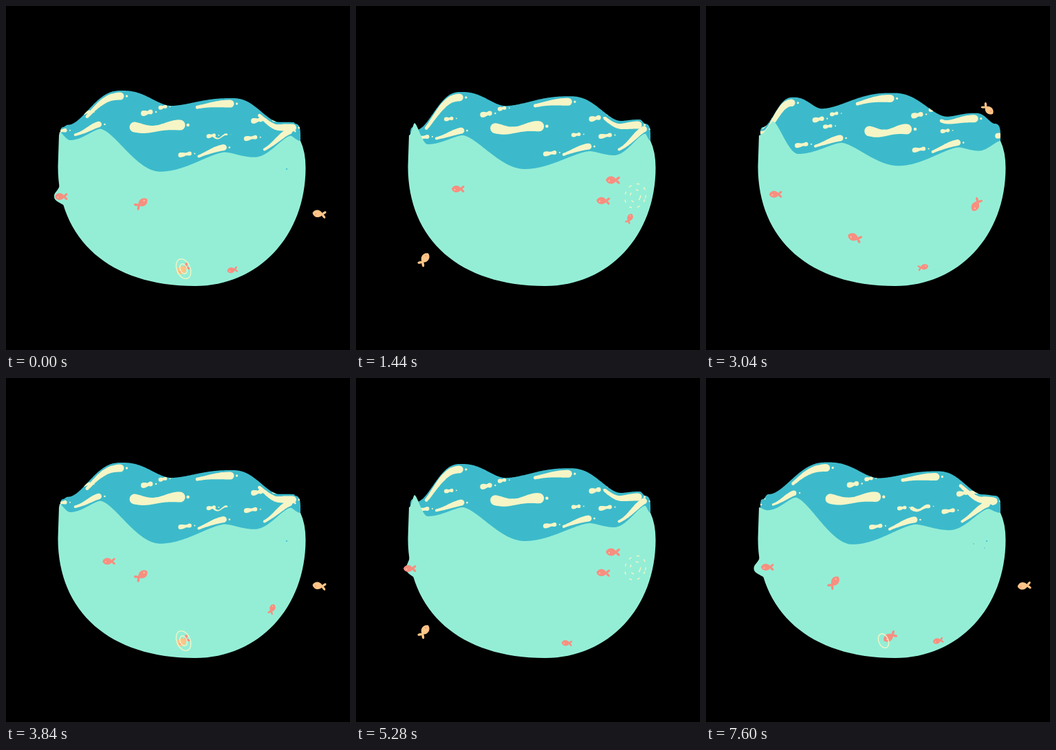
An HTML page with a canvas for the animation above (7.68 s loop, 500 by 500 pixels).

```html
<!DOCTYPE html>
<html lang="en">
<head>
<meta charset="utf-8">
<title>Fish bowl</title>
<style>
html, body { margin: 0; width: 100%; height: 100%; overflow: hidden; background: #000; }
canvas { display: block; width: 100vmin; height: 100vmin; }
</style>
</head>
<body>
<canvas id="stage" width="500" height="500"></canvas>
<script>
const ctx = document.getElementById('stage').getContext('2d');
const STEP = 80, FRAMES = 96, BEAT = 48, LAP = 32, WAVE = 16;
const MINT = '#94eed6', TEAL = '#3cbacb', CREAM = '#f6f5c6', CORAL = '#f78f80', PEACH = '#fec588';

// Paths as [time, x, y]. The back crests run left, the front humps run right.
const backCrest = [[-4,424,176],[2,412,165],[16,328,134],[32,168,123],[44,93,151],[47,83,175]];
const backTrough = [[-10,426,172],[2,385,167],[16,240,145],[28,103,160],[34,88,180]];
const frontHump = [[0,78,183],[2,85,170],[14,125,171],[18,155,188],[28,265,211],[34,340,211],[44,398,195],[51,424,184]];
const frontTrough = [[-4,79,184],[2,104,201],[14,203,241],[18,245,237],[34,375,217],[46,428,196]];

// Pool of light between the waves: [time, x, y, length, width]
const pool = [[6,148,172,20,0],[12,197,176,57,11],[16,220,176,66,15],[28,306,188,38,12],[33,312,190,14,0]];

// Droplets of light beside each wave top: [dx, dy, length, width]
const crestDrops = [[37,32,18,8],[60,24,13,6]];
const humpDrops = [[-20,-24,14,6],[-58,3,20,7]];

// Closed swimming paths as [time, x, y].
const tour = [[0,198,286],[5,240,262],[15,382,258],[18,372,253],[25,330,258],[28,326,247],[30,346,239],[38,392,290],
  [47,266,377],[56,195,413],[62,118,398],[66,100,367],[73,160,342],[78,208,332],[84,225,340],[91,178,318],[95,187,296]];
const leap = [[0,454,302],[11,405,278],[18,358,283],[24,305,270],[28,282,236],[30,274,172],[34,328,97],[41,465,210],[45,475,290]];
const bumper = [[0,79,277],[2,77,277],[14,147,267],[18,147,266],[24,163,262],[28,159,263],[31,88,275]];
const patrol = [[0,328,384],[3,302,384],[14,374,358],[18,398,308],[21,405,296],[28,360,370]];

// Ripples: x, y, start beat, tilt
const ripples = [[258,382,46,-.4],[162,342,24,0],[406,276,11,.4]];

const mod = (a, n) => ((a % n) + n) % n;
const clamp = v => Math.max(0, Math.min(1, v));
const smooth = u => u * u * (3 - 2 * u);

// Smooth curve through the keys; with a period the path is closed.
function sample(keys, t, period) {
  const count = keys.length;
  if (period) t = mod(t, period);
  else if (t < keys[0][0] || t > keys[count - 1][0]) return null;
  const key = i => {
    if (!period) return keys[Math.max(0, Math.min(count - 1, i))];
    const [time, ...rest] = keys[mod(i, count)];
    return [time + Math.floor(i / count) * period, ...rest];
  };
  let i = 0;
  while (i < count - (period ? 1 : 2) && keys[i + 1][0] <= t) i++;
  const p = key(i - 1), a = key(i), b = key(i + 1), n = key(i + 2);
  const h = b[0] - a[0], u = (t - a[0]) / h;
  return a.slice(1).map((v, j) => {
    const k = j + 1;
    const m0 = (b[k] - p[k]) / (b[0] - p[0]) * h, m1 = (n[k] - v) / (n[0] - a[0]) * h;
    return v + u * (m0 + u * (3 * (b[k] - v) - 2 * m0 - m1 + u * (2 * (v - b[k]) + m0 + m1)));
  });
}

// Every live copy of a path in the current wave phase.
function copies(keys, phase) {
  const out = [];
  for (let t = phase - WAVE; t < 64; t += WAVE) {
    const s = sample(keys, t);
    if (s) out.push(s);
  }
  return out;
}

// Height function through crests and troughs; skew > 1 widens the crests.
function profile(first, last, tops, dips, skew) {
  const inner = [...tops, ...dips].filter(p => p[0] > first[0] && p[0] < last[0]);
  const pts = [first, ...inner.sort((a, b) => a[0] - b[0]), last];
  return x => {
    let i = 0;
    while (i < pts.length - 2 && pts[i + 1][0] < x) i++;
    let a = pts[i], b = pts[i + 1];
    if (a[1] > b[1]) [a, b] = [b, a];
    const u = clamp((x - a[0]) / (b[0] - a[0]));
    return a[1] + (b[1] - a[1]) * smooth(u ** skew);
  };
}

function trace(height, from, to) {
  for (let x = from; x <= to; x++) ctx.lineTo(x, height(x));
}

function dot(x, y, r) {
  ctx.moveTo(x + r, y);
  ctx.arc(x, y, r, 0, 7);
}

// Streak of light along a height function; girth shapes it from 0 to 1.
function streak(x0, x1, height, width, girth) {
  if (width < .5) return;
  ctx.beginPath();
  for (let x = x0; x <= x1; x++) dot(x, height(x), width / 2 * girth((x - x0) / (x1 - x0)));
  dot(x1 + width / 2 + 4, height(x1), width * .15);
  ctx.fill();
}

function drops(list, x, y, scale, slope) {
  for (const [dx, dy, length, width] of list) {
    const cx = x + dx, half = (length - width) / 2;
    streak(cx - half, cx + half, px => y + dy + (px - cx) * slope, width * scale, u => .8 + .2 * Math.cos(u * 5));
  }
}

function glints(phase, back, front, crests, humps) {
  const taper = u => .45 + .55 * smooth(u);
  ctx.fillStyle = CREAM;
  for (const [x, y] of crests) {
    const scale = clamp((x - 70) / 60);
    streak(x - 50 * scale, x - 2, px => back(px) + 8, 11 * scale, taper);
    drops(crestDrops, x, y, scale, -.2);
  }
  for (const [x, y] of humps) {
    const scale = clamp((x - 70) / 70);
    streak(x - 38 * scale, x - 2, px => front(px) - 7, 9 * scale, taper);
    drops(humpDrops, x, y, scale, -.15);
  }
  for (const [x, y, length, width] of copies(pool, phase)) {
    const x0 = x - length / 2;
    streak(x0, x0 + length, px => y + 3 * Math.sin((px - x0) / length * 5), width, u => .8 + .2 * Math.cos(u * 6.3));
  }
}

function water(phase) {
  const crests = copies(backCrest, phase), humps = copies(frontHump, phase);
  const back = profile([83, 176], [420, 171], crests, copies(backTrough, phase), 1.3);
  const front = profile([77, 188], [428, 196], humps, copies(frontTrough, phase), .82);
  ctx.save();
  ctx.beginPath();
  ctx.moveTo(79, 250);
  ctx.lineTo(79, 184);
  ctx.quadraticCurveTo(79, 176, 83, 176);
  trace(back, 83, 420);
  ctx.quadraticCurveTo(428, 171, 428, 186);
  ctx.lineTo(428, 250);
  ctx.closePath();
  ctx.fillStyle = TEAL;
  ctx.fill();
  ctx.clip();
  glints(phase, back, front, crests, humps);
  ctx.restore();
  return front;
}

function bowl(front, bulge) {
  ctx.fillStyle = MINT;
  ctx.beginPath();
  trace(front, 77, 428);
  ctx.quadraticCurveTo(435.5, 212, 435.5, 235);
  ctx.bezierCurveTo(435.5, 334, 367, 407, 275, 407);
  ctx.bezierCurveTo(151, 407, 75.5, 340, 75.5, 233);
  ctx.closePath();
  ctx.fill();
  if (bulge <= 0) return;
  const x = 78 - bulge;
  ctx.beginPath();
  ctx.moveTo(78, 260);
  ctx.bezierCurveTo(77, 268, x, 270, x, 277);
  ctx.bezierCurveTo(x, 284, 80, 286, 86, 291);
  ctx.fill();
}

function fish(keys, t, period, size, color, { tail = color, heading } = {}) {
  const [x, y] = sample(keys, t, period);
  const p = sample(keys, t - .3, period), q = sample(keys, t + .3, period);
  ctx.save();
  ctx.translate(x, y);
  ctx.rotate(heading ?? Math.atan2(q[1] - p[1], q[0] - p[0]));
  ctx.scale(size, size);
  ctx.fillStyle = tail;
  for (const side of [-1, 1]) {
    ctx.beginPath();
    ctx.ellipse(-8.5, side * 2.5, 3.8, 1.8, -side * .75, 0, 7);
    ctx.fill();
  }
  ctx.fillRect(-8, -1.2, 4, 2.4);
  ctx.fillStyle = color;
  ctx.beginPath();
  ctx.moveTo(9, 0);
  ctx.bezierCurveTo(6, -7.3, -3, -7.3, -7, 0);
  ctx.bezierCurveTo(-3, 7.3, 6, 7.3, 9, 0);
  ctx.fill();
  ctx.fillStyle = color === CORAL ? '#fdd0b0' : CORAL;
  ctx.beginPath();
  dot(4, -1, 1);
  ctx.fill();
  ctx.restore();
}

function ripple([x, y, start, tilt], beat) {
  const age = mod(beat - start, BEAT);
  if (age < 1 || age > 8) return;
  const r = 18 * (1 - Math.exp(-age * .9));
  ctx.save();
  ctx.translate(x, y);
  ctx.rotate(tilt);
  ctx.strokeStyle = CREAM;
  ctx.lineWidth = 1.4;
  ctx.lineCap = 'round';
  if (age > 2) ctx.setLineDash([Math.max(1, 17 - 2 * age), 2 + age]);
  for (const k of age < 2 ? [1] : [1, .5]) {
    ctx.beginPath();
    ctx.ellipse(0, 0, r * k * (age < 3 ? .65 : .82), r * k, 0, 0, 6.284);
    ctx.stroke();
  }
  ctx.restore();
}

function splash(beat) {
  const age = beat - 28;
  if (age < 1 || age > 5) return;
  const k = Math.sin(age / 6 * Math.PI) * 1.15;
  ctx.save();
  ctx.translate(277, 187);
  ctx.scale(k, k);
  ctx.strokeStyle = MINT;
  ctx.lineWidth = 4;
  ctx.lineCap = 'round';
  for (const [cx, ex, ey] of [[-3, -11, -8], [8, 9, -12], [4, 9, -5]]) {
    ctx.beginPath();
    ctx.moveTo(0, 0);
    ctx.quadraticCurveTo(cx, -3, ex, ey);
    ctx.stroke();
  }
  ctx.restore();
}

function specks(beat) {
  const age = mod(beat - 46, BEAT);
  if (age > 2) return;
  ctx.fillStyle = TEAL;
  ctx.beginPath();
  dot(408, 237, 1.1);
  if (age < 2) { dot(389, 241, .8); dot(405, 247, .7); }
  ctx.fill();
}

function draw(frame) {
  const beat = frame % BEAT, lap = frame % LAP;
  ctx.fillStyle = '#000';
  ctx.fillRect(0, 0, 500, 500);
  const front = water(frame % WAVE);
  bowl(front, 8.5 - .4 * ((lap + 1) % LAP) ** 2);
  specks(beat);
  splash(beat);
  fish(bumper, lap, LAP, .9, CORAL, { heading: Math.PI });
  fish(patrol, lap, LAP, .75, CORAL);
  for (const t of [beat, beat + BEAT]) {
    const outside = t >= 48 && t < 73;
    fish(tour, t, FRAMES, 1, outside ? PEACH : CORAL, { tail: t === 48 ? CORAL : undefined });
  }
  fish(leap, beat, BEAT, .95, beat >= 29 || beat < 11 ? PEACH : CORAL);
  ripples.forEach(r => ripple(r, beat));
}

const begin = performance.now();
let shown = -1;
function tick() {
  const frame = Math.floor((performance.now() - begin) / STEP) % FRAMES;
  if (frame !== shown) draw(shown = frame);
  requestAnimationFrame(tick);
}
tick();
</script>
</body>
</html>
```
